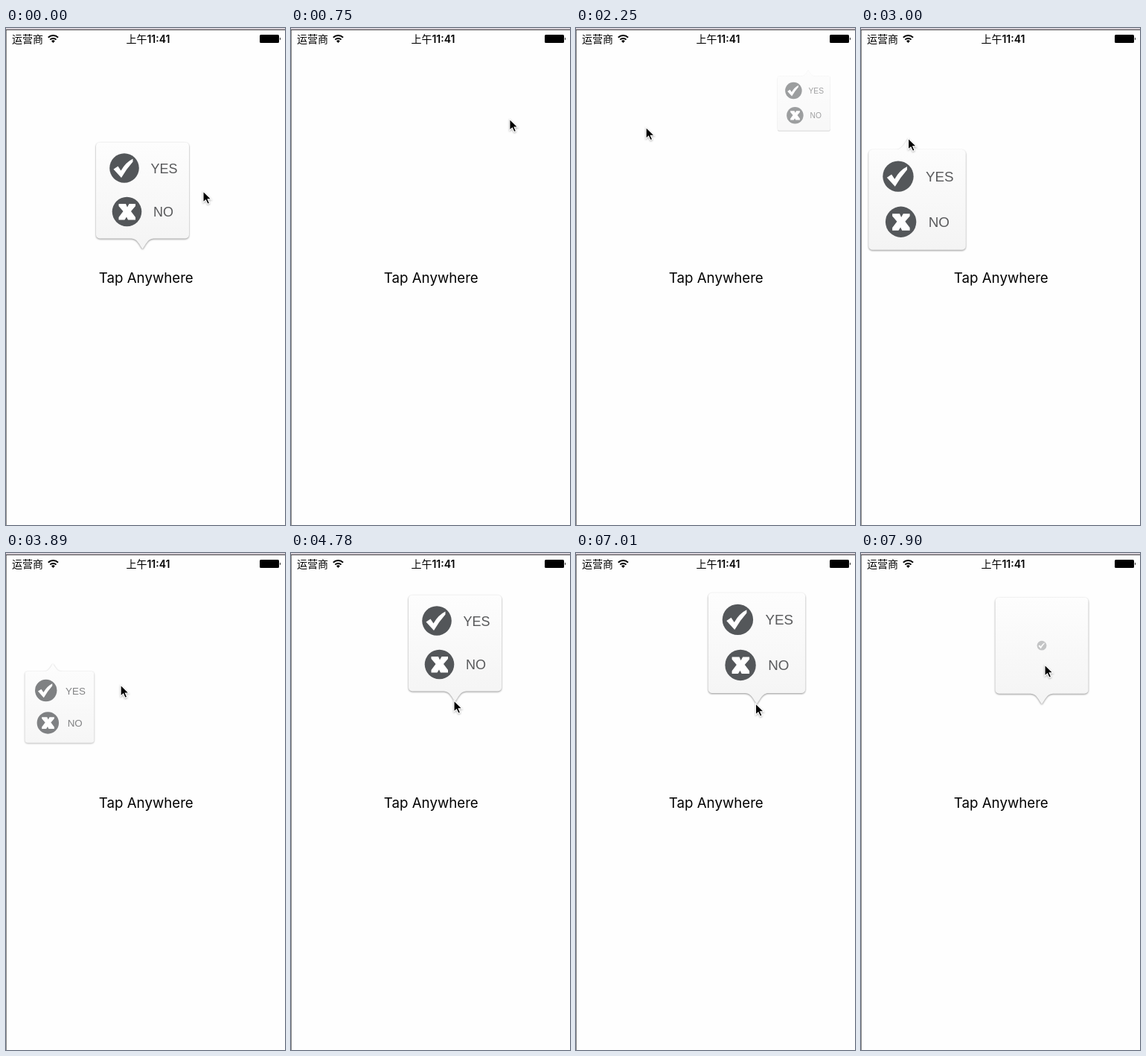
These frames come from a looping animation (375x667 px, 8000 ms). An HTML page:

```html
<!DOCTYPE html>
<html lang="zh-CN">
<head>
<meta charset="utf-8">
<title>Popover</title>
<style>
  html, body { margin: 0; width: 100%; height: 100%; overflow: hidden; background: #fefefe; }
  svg { display: block; }
  text { font-family: Inter, "Noto Sans CJK SC", "Noto Sans CJK", sans-serif; }
  .row { font: 18px "Liberation Sans", Arial, sans-serif; fill: #58595b; }
  #box { filter: drop-shadow(0 1px 1.2px rgba(0, 0, 0, .42)); }
</style>
</head>
<body>
<svg width="375" height="667" viewBox="0 0 375 667">
  <defs>
    <linearGradient id="paper" x1="0" y1="0" x2="0" y2="1">
      <stop offset="0" stop-color="#fdfdfd"/>
      <stop offset="1" stop-color="#f4f4f4"/>
    </linearGradient>
    <g id="check">
      <circle r="19.8" fill="#535659"/>
      <path fill="#fff" d="M-14.5 1.5L-8.5-2.5L-4.5 3.5Q2-8 11.5-12.5V-8.5Q3 1-4 13Z"/>
    </g>
    <g id="cross">
      <circle r="19.8" fill="#535659"/>
      <path fill="#fff" d="M-11-10.5h9.5l2 4.5 2.5-4.5h8.5v3l-6 7 6 8v3.5h-10l-2-4-2.5 4h-8v-3.5l6-8-6-7z"/>
    </g>
  </defs>

  <rect width="375" height="667" fill="#fefefe"/>
  <rect width="375" height="2" fill="#d5ced5"/>
  <rect y="2" width="375" height="1" fill="#4a464a"/>
  <rect y="3" width="1" height="664" fill="#8c8c8c"/>

  <g>
    <text x="8" y="20" font-size="14">运营商</text>
    <text x="191" y="20" font-size="14" font-weight="500" text-anchor="middle">上午<tspan font-weight="600">11:41</tspan></text>
    <path d="M56.8 12.8a9.4 9.4 0 0 1 13.2 0M59.3 15.6a5.8 5.8 0 0 1 8.2 0" fill="none" stroke="#000" stroke-width="2"/>
    <path d="M63.4 20l-2.4-2.5a3.4 3.4 0 0 1 4.8 0z"/>
    <rect x="341" y="9" width="26" height="11" rx="1.5"/>
    <path d="M368 12.5q2 2 0 4z"/>
  </g>

  <text x="188.3" y="342" font-size="18.7" text-anchor="middle">Tap Anywhere</text>

  <g id="popover">
    <path id="box" fill="url(#paper)"/>
    <g id="inside">
      <g id="menu">
        <use href="#check" x="38" y="34.5"/>
        <text class="row" x="73.5" y="41.3">YES</text>
        <use href="#cross" x="41.5" y="93"/>
        <text class="row" x="77" y="99.5">NO</text>
      </g>
      <use id="done" href="#check"/>
    </g>
  </g>

  <path id="cursor" d="M0 0V15L3.5 11.8L6 17.3L8.6 16.2L6.2 10.9H11Z" stroke="#fff" stroke-width="1.1"
        style="filter:drop-shadow(0 1px 1px rgba(0,0,0,.3))"/>
</svg>
<script>
const LOOP = 8000, W = 125, H = 129, ARROW = 14;

// x, y: arrow tip; left: box edge relative to the tip; times in ms
const popovers = [
  { x: 183.5, y: 296.5, left: -62.5, show: -1000, hide: 145 },
  { x: 312, y: 56.5, left: -72.5, up: true, show: 1160, hide: 2105 },
  { x: 63, y: 148.5, left: -50.5, up: true, show: 2810, hide: 3785 },
  { x: 220.5, y: 199.5, left: -62.5, show: 4490, pick: 5550, hide: 6050 },
  { x: 243, y: 202.7, left: -62.5, show: 6820, pick: 7645, hide: 9000 }
];

// time, x, y
const cursorPath = [
  [0, 265, 219], [350, 265, 219], [1050, 312.5, 60], [1550, 312.5, 60],
  [2100, 101, 130], [2650, 63.5, 148], [3330, 63.5, 148], [4340, 219, 198],
  [4850, 219, 198], [5380, 248, 95], [6130, 248, 95], [6720, 241.5, 202],
  [7120, 241.5, 202], [7600, 247, 150]
];

const el = id => document.getElementById(id);
const ramp = (t, start, length) => Math.min(1, Math.max(0, (t - start) / length));
const ease = p => p * p * (3 - 2 * p);
const mix = (a, b, p) => a + (b - a) * p;

function boxPath({ left, up }) {
  const r = 5, right = left + W;
  const side = up ? 1 : -1;
  const near = side * ARROW, far = side * (ARROW + H);
  const sweep = up ? 1 : 0;
  const corner = (x, y) => `A${r} ${r} 0 0 ${sweep} ${x} ${y}`;
  return `M0 0C4 ${side * 5} 7 ${near} 15 ${near}H${right - r}${corner(right, near + side * r)}` +
    `V${far - side * r}${corner(right - r, far)}H${left + r}${corner(left, far - side * r)}` +
    `V${near + side * r}${corner(left + r, near)}H-15C-7 ${near} -4 ${side * 5} 0 0Z`;
}

function drawPopover(t) {
  const pop = popovers.find(p => t >= p.show && t < p.hide + 300);
  el("popover").style.display = pop ? "" : "none";
  if (!pop) return;

  const grow = ease(ramp(t, pop.show, 200));
  const settle = ease(ramp(t, pop.show + 200, 80));
  const leave = ease(ramp(t, pop.hide, 300));
  const scale = (mix(0.1, 1.05, grow) - 0.05 * settle) * mix(1, 0.1, leave);
  const picked = pop.pick ?? Infinity;
  const done = ease(ramp(t, picked + 180, 200));

  el("popover").setAttribute("transform", `translate(${pop.x} ${pop.y}) scale(${scale})`);
  el("popover").setAttribute("opacity", grow * mix(1, 0.1, leave));
  el("box").setAttribute("d", boxPath(pop));
  el("inside").setAttribute("transform", `translate(${pop.left} ${pop.up ? ARROW : -ARROW - H})`);
  el("menu").setAttribute("opacity", 1 - ease(ramp(t, picked, 200)));
  el("done").setAttribute("transform", `translate(${W / 2} ${H / 2}) scale(${done})`);
  el("done").setAttribute("opacity", done);
}

function drawCursor(t) {
  const next = cursorPath.findIndex(step => step[0] > t);
  const b = cursorPath.at(next);
  const a = next > 0 ? cursorPath[next - 1] : b;
  const p = ease(ramp(t, a[0], b[0] - a[0] || 1));
  el("cursor").setAttribute("transform", `translate(${mix(a[1], b[1], p)} ${mix(a[2], b[2], p)})`);
}

const began = performance.now();
function frame() {
  const t = (performance.now() - began) % LOOP;
  drawPopover(t);
  drawCursor(t);
  requestAnimationFrame(frame);
}
frame();
</script>
</body>
</html>
```
